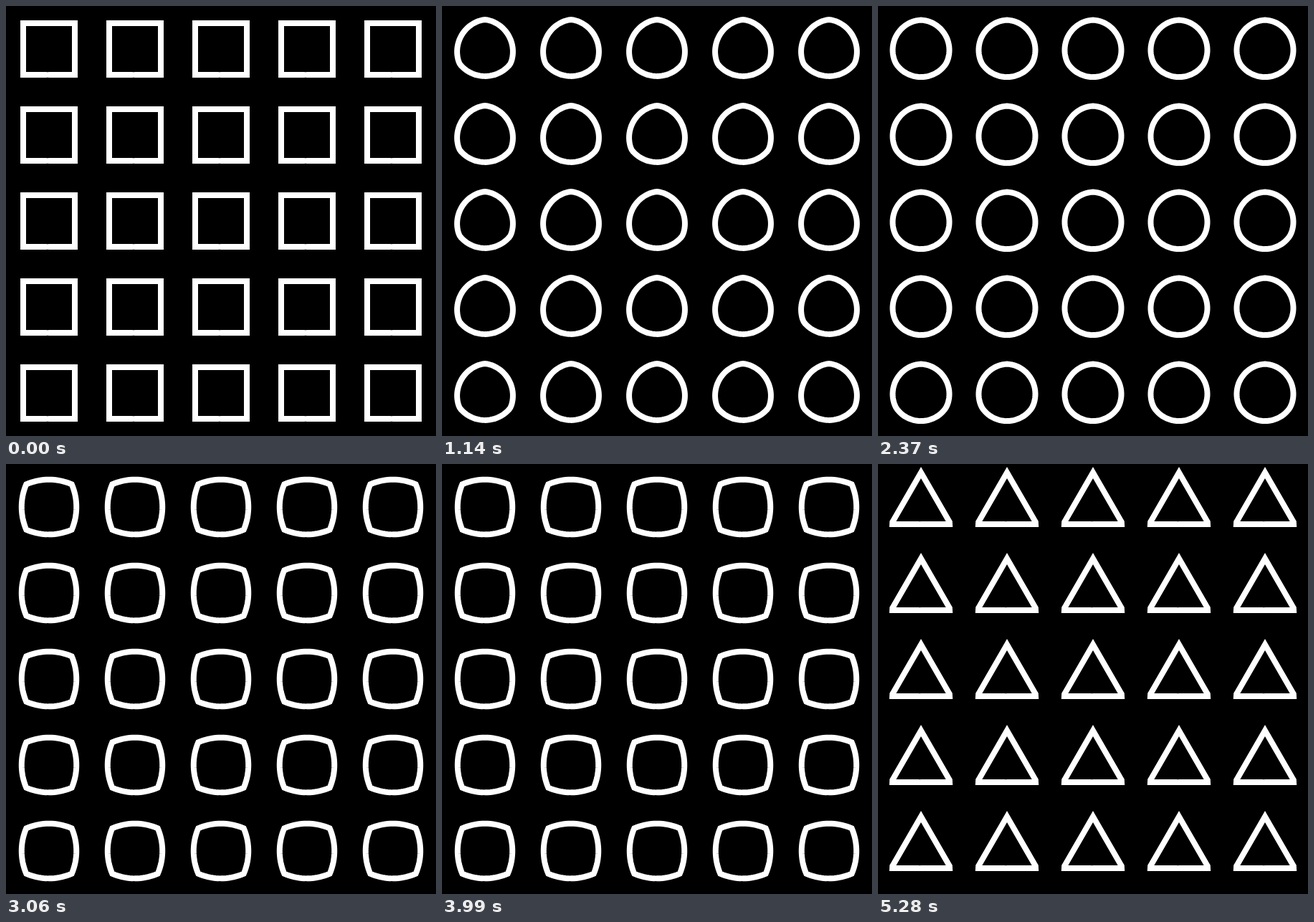
Recreate the animation shown at these times as an HTML page with a canvas. Size 600 by 600 pixels, loop 5400 ms.

```html
<!DOCTYPE html>
<html lang="en">
<head>
<meta charset="utf-8">
<title>Shape grid</title>
<style>
  html, body { margin: 0; width: 100%; height: 100%; overflow: hidden; background: #000; }
  canvas { display: block; }
</style>
</head>
<body>
<canvas id="stage" width="600" height="600"></canvas>
<script>
const ctx = document.getElementById('stage').getContext('2d');
const LOOP = 5400, PHASE = 900, MORPH = 750, STEP = 30, POINTS = 72;

// Every outline starts at the bottom centre and runs to the right.
const outline = at => Array.from({ length: POINTS }, (_, i) => at(i / POINTS));

function turn(x, y, a) {
  const c = Math.cos(a), s = Math.sin(a);
  return [x * c + y * s, y * c - x * s];
}

// Regular polygon sampled at equal distances, with its width limited to 80.
function polygon(sides, apothem) {
  const length = 2 * apothem * Math.tan(Math.PI / sides);
  return outline(u => {
    const along = u * sides + 0.5, side = Math.floor(along);
    const [x, y] = turn((along - side - 0.5) * length, apothem, side * 2 * Math.PI / sides);
    return [Math.max(-40, Math.min(40, x)), y];
  });
}

const circle = outline(u => turn(0, 40, u * 2 * Math.PI));
const square = polygon(4, 36);
const triangle = polygon(3, 24);
const sequence = [square, circle, triangle, circle, square, circle, triangle];

const ease = t => t < 0.5 ? 4 * t ** 3 : 1 - 4 * (1 - t) ** 3;

function draw(time) {
  const phase = Math.floor(time / PHASE);
  const from = sequence[phase], to = sequence[phase + 1];
  const p = ease(Math.min(1, (time % PHASE) / MORPH));

  // The path stays open: its round ends leave a small notch at the bottom.
  const path = new Path2D();
  from.forEach(([x, y], i) => path.lineTo(x + (to[i][0] - x) * p, y + (to[i][1] - y) * p));

  ctx.setTransform(1, 0, 0, 1, 0, 0);
  ctx.fillStyle = '#000';
  ctx.fillRect(0, 0, 600, 600);
  ctx.strokeStyle = '#fff';
  ctx.lineWidth = 8;
  ctx.lineCap = 'round';
  ctx.lineJoin = 'miter';
  for (let y = 60; y < 600; y += 120) {
    for (let x = 60; x < 600; x += 120) {
      ctx.setTransform(1, 0, 0, 1, x, y);
      ctx.stroke(path);
    }
  }
}

const start = performance.now();
function tick() {
  const time = (performance.now() - start) % LOOP;
  draw(Math.floor(time / STEP) * STEP);
  requestAnimationFrame(tick);
}
tick();
</script>
</body>
</html>
```
